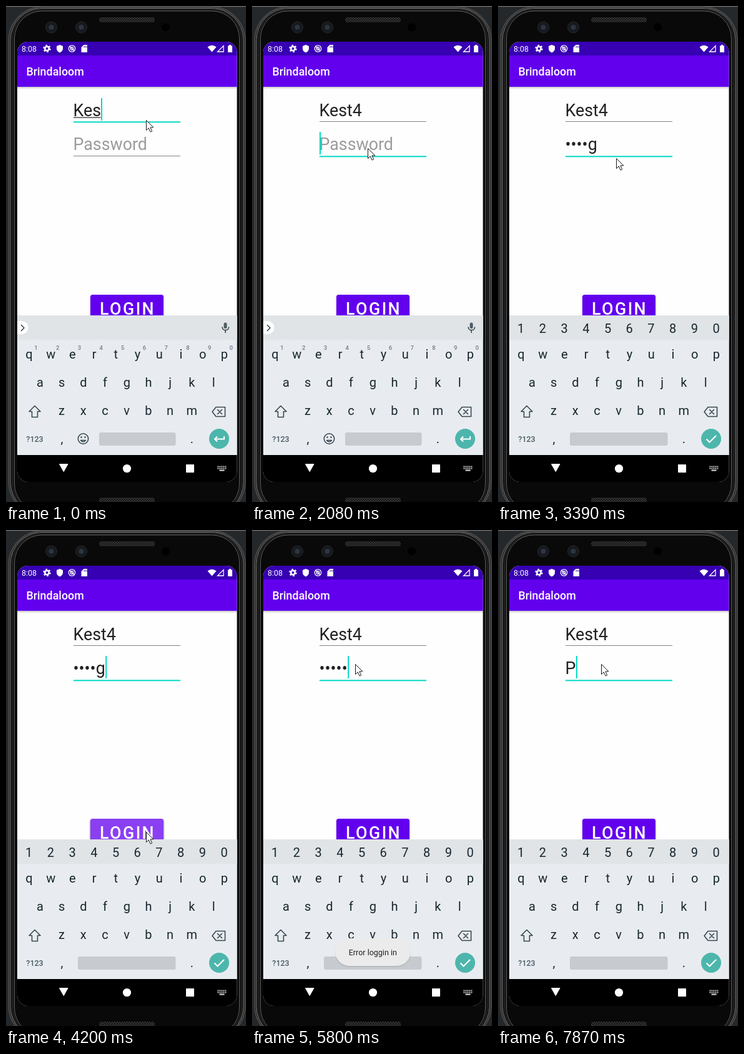
Write an HTML page that moves like this. It is 384 px wide and 792 px high and loops after 8000 ms.

```html
<!DOCTYPE html>
<html lang="en">
<head>
<meta charset="utf-8">
<title>Login screen</title>
<style>
html, body { margin: 0; width: 100%; height: 100%; overflow: hidden; background: #1b1d1f; }
svg { display: block; width: 100vw; height: 100vh; font-family: Roboto, sans-serif; }
text { white-space: pre; }
.mid { text-anchor: middle; }
.key { font-size: 20px; fill: #17262e; text-anchor: middle; }
.sup { font-size: 9.5px; font-weight: 500; fill: #727d84; text-anchor: middle; }
.field { font-size: 26.8px; fill: #212121; }
.icon { fill: none; stroke: #37474f; stroke-width: 1.6; stroke-linejoin: round; stroke-linecap: round; }
</style>
</head>
<body>
<svg viewBox="0 0 384 792" preserveAspectRatio="none">
  <defs>
    <clipPath id="screen"><rect x="18" y="57" width="351.5" height="703" rx="17"/></clipPath>
    <pattern id="mesh" width="4" height="4" patternUnits="userSpaceOnUse">
      <rect width="4" height="4" fill="#161616"/>
      <path d="M0 0L4 4M4 0L0 4" stroke="#3c3c3c" stroke-width=".8"/>
    </pattern>
    <linearGradient id="drop" x2="0" y2="1">
      <stop stop-color="#000" stop-opacity=".22"/><stop offset="1" stop-color="#000" stop-opacity="0"/>
    </linearGradient>
  </defs>

  <!-- phone body -->
  <rect width="384" height="792" fill="#25282a"/>
  <rect width="384" height="1.2" fill="#777"/>
  <g fill="none">
    <rect x="4.5" y="1.5" width="378" height="812" rx="54" fill="#0b0b0b" stroke="#4b4b4b" stroke-width="2"/>
    <rect x="7" y="3.5" width="373" height="808" rx="51" stroke="#8a8a8a"/>
    <rect x="10.5" y="6" width="366" height="803" rx="47" fill="#090909" stroke="#1d1d1d" stroke-width="3"/>
    <rect x="13.5" y="8" width="360" height="799" rx="44" stroke="#626262"/>
  </g>
  <rect x="149" y="18" width="89" height="8" rx="3.5" fill="url(#mesh)"/>
  <rect x="149" y="785" width="89" height="9" rx="3.5" fill="url(#mesh)"/>
  <g fill="#16191d" stroke="#25292e">
    <circle cx="72.5" cy="34" r="9"/><circle cx="120.5" cy="34" r="9"/>
  </g>
  <g fill="#2c3540"><circle cx="72.5" cy="34" r="4"/><circle cx="120.5" cy="34" r="4"/></g>
  <circle cx="255.500" cy="34" r="6.5" fill="#000"/>

  <g clip-path="url(#screen)">
    <rect x="18" y="57" width="352" height="703" fill="#fefefe"/>
    <rect x="18" y="129" width="352" height="4" fill="url(#drop)"/>
    <rect x="18" y="57" width="352" height="22" fill="#3700b3"/>
    <rect x="18" y="79" width="352" height="50" fill="#6200ee"/>
    <text x="25" y="73" font-size="12.5" fill="#fff">8:08</text>
    <text x="32.500" y="110.500" font-size="17.86" font-weight="500" fill="#fff">Brindaloom</text>

    <!-- status icons -->
    <g fill="#fff">
      <circle cx="65.500" cy="68" r="3.2" fill="none" stroke="#fff" stroke-width="2.6"/>
      <circle cx="65.500" cy="68" r="5.2" fill="none" stroke="#fff" stroke-width="2" stroke-dasharray="2.6 2.845"/>
      <path d="M86 62l5 2v4q0 4-5 6.500q-5-2.500-5-6.500v-4z"/>
      <circle cx="105.500" cy="68" r="5.2" fill="none" stroke="#fff" stroke-width="1.3"/>
      <circle cx="105.500" cy="68" r="2.300" fill="none" stroke="#fff" stroke-width="1.3"/>
      <path d="M102 64.500l7 7" stroke="#fff" stroke-width="1.2"/>
      <path d="M124.500 62h5.500v12h-9.500v-8z"/>
      <path d="M125 64v2.500M127 64v2.500M129 64v2.500" stroke="#3700b3" stroke-width=".9"/>
      <path d="M322.500 65.500q7-5.500 14 0l-7 8z"/>
      <path d="M348 63.500v9.500h-9.500z" fill="none" stroke="#fff" stroke-width="1.3"/>
      <path d="M355 63.500h2v-1.500h3v1.500h2v10.500h-7z"/>
    </g>

    <!-- form -->
    <text id="user" class="field" x="107.5" y="175.5"></text>
    <rect id="compose" x="108" y="177.500" height="1.2" fill="#212121"/>
    <rect id="userLine" x="108" width="171"/>
    <text id="pass" class="field" x="107.5" y="230"></text>
    <rect id="passLine" x="108" width="171"/>
    <rect id="caret" width="2" height="36" fill="#03dac5"/>
    <rect id="shade" x="133.500" y="461.500" width="120" height="50" rx="5" fill="#000"/>
    <rect id="button" x="135" y="461" width="117" height="50" rx="3.500"/>
    <text x="150" y="493" font-size="26.8" font-weight="500" letter-spacing="2.4" fill="#fff">LOGIN</text>

    <!-- keyboard -->
    <rect x="18" y="494" width="352" height="223" fill="#e8ecf0"/>
    <rect x="18" y="494" width="352" height="39" fill="#e0e4e7"/>
    <g id="keys"></g>
    <g class="icon">
      <path d="M46 638.500l9 9h-4.500v9h-9v-9h-4.500z"/>
      <path d="M336 640.500h14.500v15h-14.500l-6-7.500z"/>
      <path d="M338.500 644.500l7 7m0-7l-7 7"/>
    </g>
    <text class="mid" x="46" y="696" font-size="12.5" font-weight="500" fill="#4a5a63">?123</text>
    <text class="key" x="89.500" y="698">,</text>
    <text class="key" x="297.500" y="698">.</text>
    <rect id="space" y="681" height="21" rx="3" fill="#c7cbcf"/>
    <circle cx="341" cy="691" r="16" fill="#4db6ac"/>
    <g id="words">
      <path d="M18 503h7a10.500 10.500 0 0 1 0 21h-7z" fill="#fff"/>
      <path class="icon" d="M24.500 509.500l4.500 4.500l-4.500 4.500"/>
      <rect x="348.500" y="505.500" width="5" height="9.500" rx="2.500" fill="#505d64"/>
      <path class="icon" d="M346 513a5.300 5.300 0 0 0 10.500 0M351 518.500v3" stroke-width="1.4"/>
      <circle class="icon" cx="123.500" cy="691" r="8.200"/>
      <path class="icon" d="M119.500 693.500q4 4.500 8 0z"/>
      <circle cx="120.500" cy="688.500" r="1.300" fill="#37474f"/>
      <circle cx="126.500" cy="688.500" r="1.300" fill="#37474f"/>
      <path d="M349 687v4.500h-15m4-4l-4 4l4 4" fill="none" stroke="#fff" stroke-width="2"/>
      <g id="sups"></g>
    </g>
    <g id="digits">
      <path d="M333.500 691.500l5 5l10.500-10.500" fill="none" stroke="#fff" stroke-width="2.100"/>
    </g>

    <!-- toast -->
    <g id="toast">
      <rect x="133" y="653" width="121" height="45" rx="22" fill="#000" opacity=".08"/>
      <rect x="133.500" y="652" width="120" height="44" rx="22" fill="#ebebec"/>
      <text class="mid" x="193.300" y="679" font-size="12.5" fill="#222">Error loggin in</text>
    </g>

    <!-- navigation -->
    <rect x="18" y="717" width="352" height="43"/>
    <g fill="#fff">
      <path d="M85.500 731.500h13.500l-6.750 12z" stroke="#fff" stroke-linejoin="round"/>
      <circle cx="193.500" cy="738.500" r="6.600"/>
      <rect x="288" y="732" width="13" height="13" rx=".8"/>
    </g>
    <path d="M338.500 735.500h14M338.500 738.500h14" stroke="#ddd" stroke-width="1.8" stroke-dasharray="1.8 1.200"/>
    <path d="M341.500 741.500h8" stroke="#ddd" stroke-width="1.8"/>
  </g>

  <path id="mouse" d="M.5.5v16l3.800-3.600l2.800 6.200l2.600-1.200l-2.800-6h5z" fill="#fff" stroke="#1a1a1a"/>
</svg>
<script>
const LOOP = 8000, TEAL = '#03dac5', PITCH = 34.7;
const el = id => document.getElementById(id);
const set = (id, attrs) => { for (const k in attrs) el(id).setAttribute(k, attrs[k]); };
const show = (id, on) => set(id, { visibility: on ? 'visible' : 'hidden' });

function row(parent, chars, cls, x, y) {
  el(parent).innerHTML += [...chars].map((c, i) =>
    `<text class="${cls}" x="${x + i * PITCH}" y="${y}">${c}</text>`).join('');
}
row('keys', 'qwertyuiop', 'key', 37, 563);
row('keys', 'asdfghjkl', 'key', 54.5, 608);
row('keys', 'zxcvbnm', 'key', 89, 653);
row('sups', '1234567890', 'sup', 48, 549);
row('digits', '1234567890', 'key', 36.7, 522);

const USER = [[-300, 'Kes'], [450, 'Kest'], [800, 'Kest4']];
const PASS = [
  [2080, ''], [2230, 'a'], [2390, '•s'], [2530, '••d'], [2660, '•••f'], [2800, '••••g'],
  [6600, '••••'], [6750, '•••'], [6900, '••'], [7020, '•'], [7150, ''], [7870, 'P']
];
const FOCUS = 2080, MASK = 4350;
const TOAST = [[0, 0], [4950, .35], [5090, .75], [5230, 1], [7020, .6], [7150, .25], [7290, 0]];
const BUTTON = [[0, '#6200ee'], [4200, '#8b3ff2'], [4350, '#7720f0'], [4500, '#6200ee']];
// start, steps, x, y
const MOVES = [
  [1350, 5, 185, 227], [2230, 2, 189, 243], [3520, 5, 224, 482], [4950, 7, 165, 214]
];
const STEP = 140;

// latest entry that has begun
const at = (list, t) => list.filter(e => e[0] <= t).pop() || list[0];

function mouseAt(t) {
  let x = 224, y = 182;
  for (const [start, steps, tx, ty] of MOVES) {
    if (t < start) break;
    const p = Math.min(1, (Math.floor((t - start) / STEP) + 1) / steps);
    x += (tx - x) * p;
    y += (ty - y) * p * p * (3 - 2 * p);
  }
  return [x, y];
}

function line(id, y, focused) {
  set(id, focused ? { y: y - .2, height: 2, fill: TEAL } : { y: y - .5, height: 1, fill: '#858585' });
}

function draw(t) {
  const inPass = t >= FOCUS;
  const [userKey, name] = at(USER, t);
  let [passKey, secret] = at(PASS, t);
  if (t >= MASK) secret = secret.replace(/g$/, '•');

  el('user').textContent = name;
  el('pass').textContent = secret || 'Password';
  el('pass').style.fill = secret ? '#212121' : '#9c9c9c';
  line('userLine', 184.5, !inPass);
  line('passLine', 239.5, inPass);

  const nameWidth = el('user').getComputedTextLength();
  const secretWidth = secret ? el('pass').getComputedTextLength() : 0;
  set('compose', { width: nameWidth - 1 });
  show('compose', !inPass);
  set('caret', { x: inPass ? 108 + secretWidth : 107.5 + nameWidth, y: inPass ? 201 : 147 });
  show('caret', Math.floor((t - (inPass ? passKey : userKey)) / 500) % 2 === 0);

  const digits = t >= 2230;
  show('words', !digits);
  show('digits', digits);
  set('space', digits ? { x: 115, width: 156.5 } : { x: 149, width: 122.5 });

  set('button', { fill: at(BUTTON, t)[1] });
  set('shade', { opacity: t >= 4200 && t < 4500 ? .22 : .08 });
  set('toast', { opacity: at(TOAST, t)[1] });
  set('mouse', { transform: `translate(${mouseAt(t)})` });
}

const begin = performance.now();
function tick() {
  draw((performance.now() - begin) % LOOP);
  requestAnimationFrame(tick);
}
tick();
</script>
</body>
</html>
```
